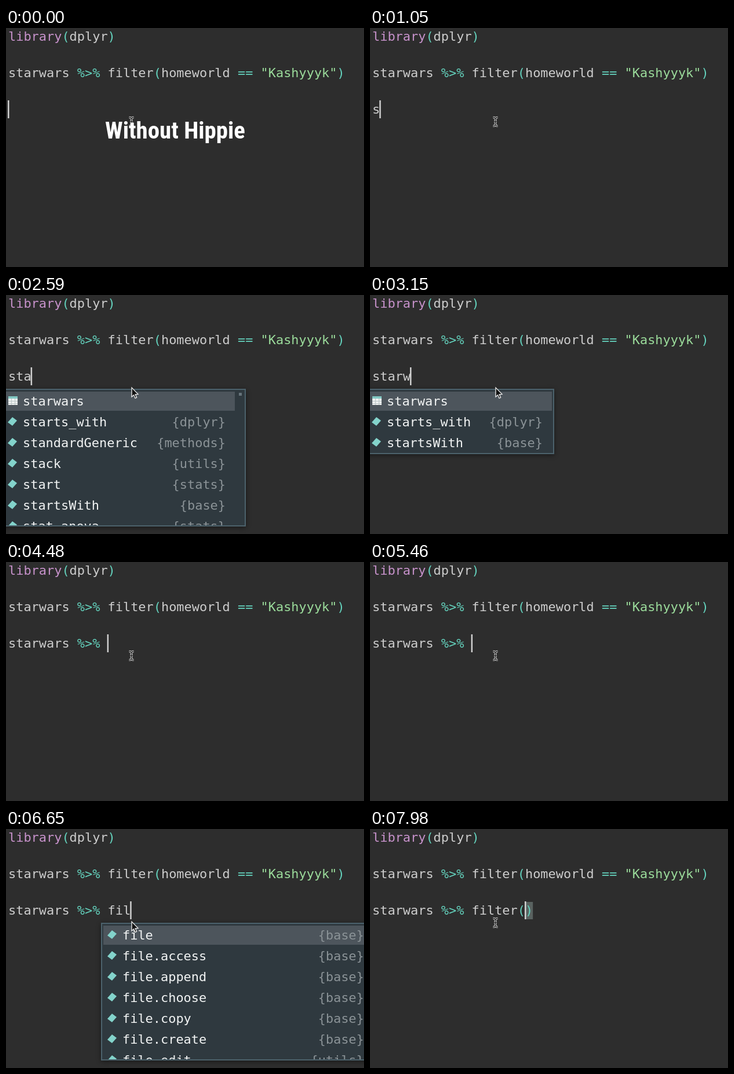
These frames come from a looping animation (618x413 px, 8000 ms). An HTML page with a canvas:

```html
<!DOCTYPE html>
<html lang="en">
<head>
<meta charset="utf-8">
<title>Code completion</title>
<style>
  html, body { margin: 0; width: 100%; height: 100%; overflow: hidden; background: #2d2d2d; }
  canvas { display: block; }
</style>
</head>
<body>
<canvas id="stage" width="618" height="413"></canvas>
<script>
const ctx = document.getElementById('stage').getContext('2d');
const LOOP = 8000, BLINK = 525;
const CODE_FONT = '21.93px "DejaVu Sans Mono", monospace';
const CHAR = 13.2, LEFT = 4;

// Each entry is "name package"
const snippets = ['shinymod', 'shinyapp', 'sapply', 'switch', 'sc', 'sm', 'sg'].map(n => n + ' snippet');
const staItems = ['starwars', 'starts_with dplyr', 'standardGeneric methods', 'stack utils',
  'start stats', 'startsWith base', 'stat.anova stats'];
const files = ['', '.access', '.append', '.choose', '.copy', '.create'].map(s => `file${s} base`);

const menus = {
  s: { x: -8, right: 566, icon: page, items: snippets },
  sta: { x: -8, right: 379, icon: diamond, items: staItems },
  starw: { x: -8, right: 298, icon: diamond, items: ['starwars', 'starts_with dplyr', 'startsWith base'] },
  fi: { x: 164, right: 645, icon: diamond, items: ['fifo base', ...files] },
  fil: { x: 164, right: 618, icon: diamond, items: [...files, 'file.edit utils'] },
  filt: { x: 164, right: 457, icon: diamond, items: ['filter dplyr', 'filter_all dplyr',
    'filter_at dplyr', 'filter_if dplyr', 'filter stats', 'Filter base'] }
};

// Start time, typed line, open menu
const steps = [
  [0, ''], [1050, 's'], [1120, 's', 's'], [1960, 'st', 'sta'], [2310, 'sta', 'sta'],
  [3010, 'star', 'starw'], [3080, 'starw', 'starw'], [3500, 'starwars'],
  [3990, 'starwars %>% '], [5740, 'starwars %>% f'], [5810, 'starwars %>% fi', 'fi'],
  [6160, 'starwars %>% fil', 'fil'], [6860, 'starwars %>% filt', 'filt'],
  [7630, 'starwars %>% filter()']
];

function rect(color, x, y, w, h) {
  ctx.fillStyle = color;
  ctx.fillRect(x, y, w, h);
}

function text(str, x, y, color) {
  ctx.fillStyle = color;
  ctx.fillText(str, x, y);
}

function shape(points, fill) {
  ctx.beginPath();
  points.forEach(([x, y]) => ctx.lineTo(x, y));
  ctx.closePath();
  ctx.fillStyle = fill;
  ctx.fill();
}

function tokenColor(token) {
  if (token === 'library') return '#c792cb';
  if (token[0] === '"') return '#9bdc9b';
  return /^[%=()]/.test(token) ? '#64d2bd' : '#cdcdcd';
}

function codeLine(line, y) {
  let x = LEFT;
  for (const token of line.match(/"[^"]*"|library|%>%|==|[()]|[^"()%=]+/g) || []) {
    text(token, x, y, tokenColor(token));
    x += ctx.measureText(token).width;
  }
}

function page(x, y) {
  shape([[x + 3, y - 7], [x + 11, y - 7], [x + 15, y - 3], [x + 15, y + 7], [x + 3, y + 7]], '#f0f2f2');
  rect('#b4babc', x + 5, y - 2, 7, 1);
  rect('#b4babc', x + 5, y + 2, 8, 1);
}

function diamond(x, y) {
  shape([[x + 8, y - 8], [x + 16, y - 2], [x + 8, y + 7], [x, y + 1]], '#83d3cb');
}

function table(x, y) {
  rect('#f0f2f2', x + 1, y - 8, 16, 15);
  rect('#83c8c3', x + 1, y - 8, 16, 4);
  for (const d of [5, 11]) rect('#b9c4c5', x + 1 + d, y - 4, 1, 11);
  for (const d of [0, 4]) rect('#b9c4c5', x + 1, y + d, 16, 1);
}

function drawMenu({ x, right, icon, items }) {
  const full = items.length * 36 + 5, scroll = full > 238;
  const h = Math.min(full, 238), w = right + (scroll ? 35 : 20) - x;
  ctx.save();
  ctx.shadowColor = 'rgba(0,0,0,.45)';
  ctx.shadowBlur = 8;
  ctx.shadowOffsetY = 2;
  rect('#4c626c', x, 162, w, h);
  ctx.restore();
  ctx.save();
  ctx.beginPath();
  ctx.rect(x + 2, 164, w - 4, h - 4);
  ctx.clip();
  rect('#2f393f', x, 162, w, h);
  rect('#4d555c', x + 4, 167, right + 16 - x - 4, 33);
  if (scroll) rect('#67747b', right + 23, 169, 5, 5);
  items.forEach((item, i) => {
    const [name, pkg] = item.split(' '), y = 183 + i * 36;
    (name === 'starwars' ? table : icon)(x + 11, y);
    text(name, x + 37, y + 8, '#f2f4f4');
    if (pkg) text(`{${pkg}}`, right - (pkg.length + 2) * CHAR, y + 8, '#8b9397');
  });
  ctx.restore();
}

function arrow() {
  const points = [[217, 160], [217, 176], [220.6, 172.8], [223, 178.4], [225.6, 177.2], [223.2, 171.8], [228, 171.4]];
  shape(points, '#111');
  ctx.strokeStyle = '#eee';
  ctx.lineWidth = 1.3;
  ctx.stroke();
}

function beam() {
  const path = new Path2D('M212.5 154.5Q216.5 154.5 216.5 158V166Q216.5 169.5 212.5 169.5' +
    'M220.5 154.5Q216.5 154.5 216.5 158M216.5 166Q216.5 169.5 220.5 169.5M214 162H219');
  for (const [color, width] of [['#d0d0d0', 3.4], ['#222', 1.3]]) {
    ctx.strokeStyle = color;
    ctx.lineWidth = width;
    ctx.stroke(path);
  }
}

function drawTitle(alpha) {
  const setSize = px => ctx.font =
    `900 ${px}px Impact, "Roboto Condensed", "Open Sans Condensed", "Open Sans", sans-serif`;
  const label = 'Without Hippie';
  ctx.save();
  ctx.globalAlpha = alpha;
  ctx.textAlign = 'center';
  setSize(42);
  setSize(Math.min(42, 42 * 242 / ctx.measureText(label).width));
  text(label, 292, 191, '#fff');
  ctx.restore();
}

function draw(t) {
  const [start, line, menu] = steps.findLast(step => step[0] <= t);
  // The caret restarts its blink only when the line changes
  const typed = steps.find(step => step[1] === line)[0];
  const paired = line.endsWith(')');
  const caretX = LEFT + (line.length - paired) * CHAR;

  rect('#2d2d2d', 0, 0, 618, 413);
  ctx.font = CODE_FONT;
  if (paired) rect('#596260', caretX, 126, CHAR, 30);
  codeLine('library(dplyr)', 22);
  codeLine('starwars %>% filter(homeworld == "Kashyyyk")', 85);
  codeLine(line, 148);
  if ((t - typed) % (2 * BLINK) < BLINK) rect('#d0d0d0', caretX - 1, 125, 2.5, 31);
  if (menu) drawMenu(menus[menu]);
  (menu ? arrow : beam)();

  const alpha = Math.min(1, (770 - t) / 280);
  if (alpha > 0) drawTitle(alpha);
}

function frame() {
  draw(performance.now() % LOOP);
  requestAnimationFrame(frame);
}
frame();
</script>
</body>
</html>
```
